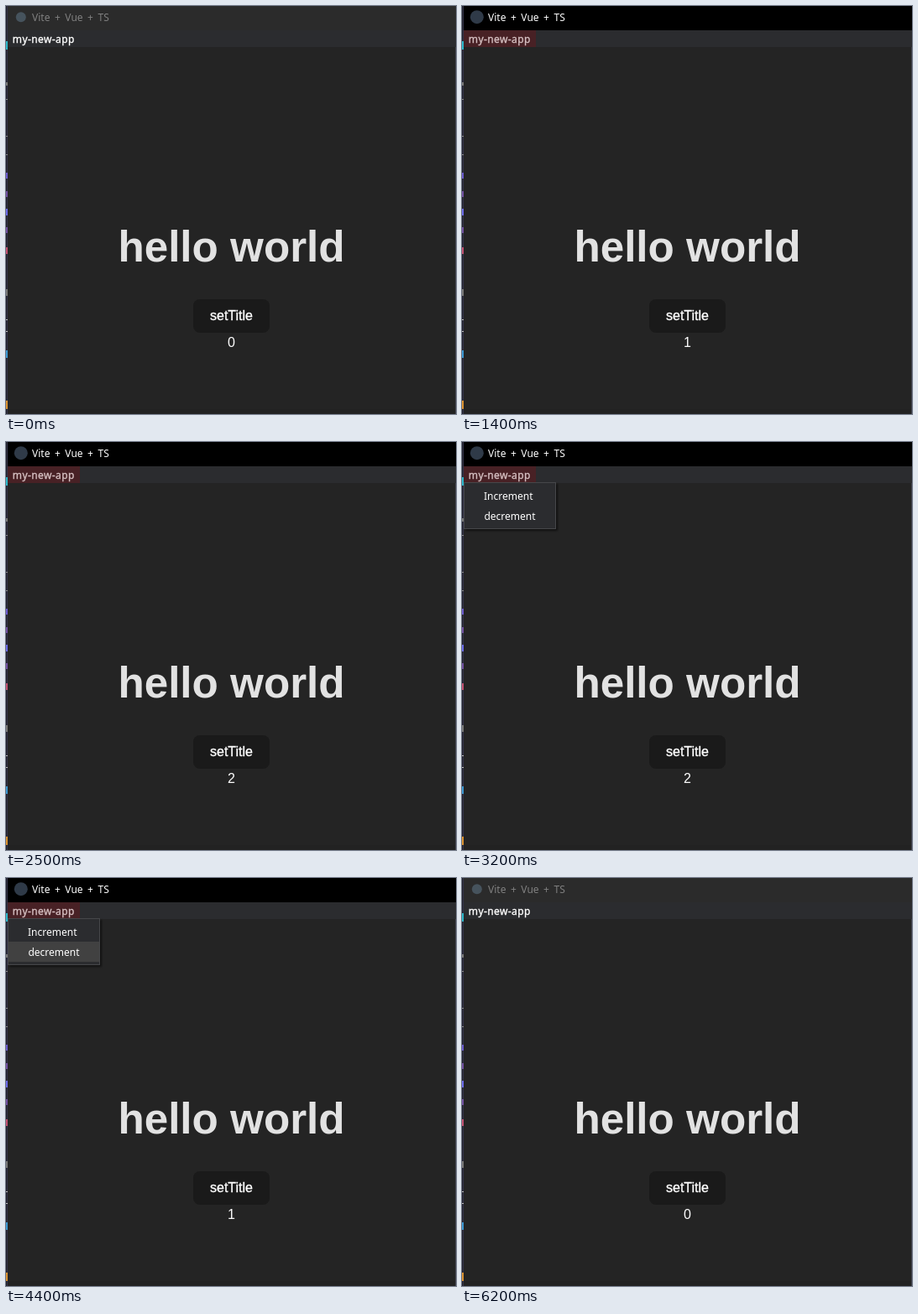
These frames come from a looping animation (536 by 487 pixels, 6300 ms). An HTML page:

```html
<!DOCTYPE html>
<html lang="en">
<head>
<meta charset="utf-8">
<title>Counter menu</title>
<style>
  html, body { margin: 0; width: 100%; height: 100%; overflow: hidden; background: #242424; }
  svg { display: block; }
  text { fill: #fff; font: 12px "Noto Sans", sans-serif; }
  #title { word-spacing: 2.4px; }
  #tabText { letter-spacing: .4px; }
  .strong { stroke: currentColor; stroke-width: .35px; color: #fff; fill: currentColor; }
  .page text { font: 16px "Liberation Sans", Arial, sans-serif; text-anchor: middle; }
  .page .heading { font-size: 51.2px; font-weight: bold; fill: #e2e2e2; }
  #menu { filter: drop-shadow(2px 2px 1px rgba(0, 0, 0, .5)); }
</style>
</head>
<body>
<svg width="536" height="487" viewBox="0 0 536 487">
  <rect width="536" height="487" fill="#242424"/>
  <rect y="481" width="536" height="6" fill="#222"/>
  <rect id="titleBar" x="2" width="534" height="29"/>
  <circle id="icon" cx="17.8" cy="13.2"/>
  <text id="title" x="31" y="18">Vite + Vue + TS</text>
  <rect x="2" y="29" width="534" height="20" fill="#2b2c2f"/>
  <rect id="tab" x="2" y="29" width="86" height="20" fill="#482125"/>
  <text id="tabText" class="strong" x="7.8" y="44">my-new-app</text>
  <g class="page">
    <text class="heading" x="268.5" y="305">hello world</text>
    <rect x="223" y="350" width="91" height="40" rx="8" fill="#1a1a1a"/>
    <text class="strong" x="268.5" y="375">setTitle</text>
    <text id="count" x="268.5" y="407"></text>
  </g>
  <g id="menu">
    <rect x="2" y="49" width="110" height="55" fill="#242424"/>
    <g id="menuBody">
      <rect x="2.5" y="48.5" width="109" height="55" fill="#2b2c2f" stroke="#46474a"/>
      <rect id="hover" x="3" width="108" height="24" fill="#414141"/>
      <text x="26" y="69">Increment</text>
      <text x="26.4" y="93">decrement</text>
    </g>
  </g>
  <rect x="535" y="49" width="1" height="438" fill="#3c3d46"/>
  <g id="edge">
    <rect width="2" height="487" fill="#1e1e28"/>
    <rect x="1" width="1" height="487" fill="#34344a"/>
  </g>
</svg>
<script>
const LOOP = 6300;
const $ = id => document.getElementById(id);

function setAttributes(node, values) {
  for (const [name, value] of Object.entries(values)) node.setAttribute(name, value);
}

// Slivers of the window behind: top, height, colour
const slivers = [
  [42, 10, '#2bb5c8'], [91, 4, '#777'], [111, 1, '#888'], [155, 1, '#888'], [177, 1, '#888'],
  [199, 7, '#6a5acd'], [221, 7, '#7050a0'], [242, 8, '#6a6ae8'], [264, 7, '#7050a0'],
  [288, 8, '#c05070'], [338, 8, '#777'], [374, 1, '#bbb'], [388, 1, '#bbb'],
  [411, 9, '#3a96d0'], [471, 10, '#d89030']
];
for (const [y, height, fill] of slivers) {
  const bar = document.createElementNS('http://www.w3.org/2000/svg', 'rect');
  setAttributes(bar, { y, height, fill, width: 2 });
  $('edge').append(bar);
}

const idle = { active: false, tab: 'normal', menu: null, hover: 0, count: 0 };

// Choosing an item closes the menu, then the tab loses its highlight and its text brightens
const choose = (time, count, release = 200) => [
  [time, { menu: null, hover: 0, count }],
  [time + release, { tab: 'dim' }],
  [time + release + 200, { tab: 'normal' }]
];
const open = time => [
  [time, { tab: 'hot', menu: 0 }],
  [time + 100, { menu: 1 }]
];

const steps = [
  [500, { active: true, menu: 0 }],
  [600, { tab: 'hot', menu: .5 }],
  [700, { menu: 1 }],
  [1000, { hover: 1 }],
  ...choose(1400, 1, 100),
  ...open(1900), [2200, { hover: 1 }],
  ...choose(2500, 2),
  ...open(3100), [3300, { hover: 2 }],
  ...choose(3600, 1),
  ...open(4200), [4400, { hover: 2 }],
  ...choose(4900, 0),
  [6200, { active: false }]
];

const tabColors = { normal: '#fff', hot: '#d6c0c2', dim: '#c8c8c8' };
const show = (id, on) => $(id).setAttribute('visibility', on ? 'visible' : 'hidden');

function draw(time) {
  const state = { ...idle };
  for (const [start, change] of steps) if (time >= start) Object.assign(state, change);

  $('titleBar').setAttribute('fill', state.active ? '#000' : '#2b2b2b');
  setAttributes($('icon'), state.active ? { r: 8, fill: '#2f3a48' } : { r: 6, fill: '#46535d' });
  $('title').style.fill = state.active ? '#fff' : '#808080';
  $('tabText').style.color = tabColors[state.tab];
  show('tab', state.tab === 'hot');
  $('menu').style.display = state.menu === null ? 'none' : '';
  $('menuBody').setAttribute('opacity', state.menu ?? 0);
  show('hover', state.hover);
  $('hover').setAttribute('y', 28 + 24 * state.hover);
  $('count').textContent = state.count;
}

function tick() {
  draw(performance.now() % LOOP);
  requestAnimationFrame(tick);
}
tick();
</script>
</body>
</html>
```
